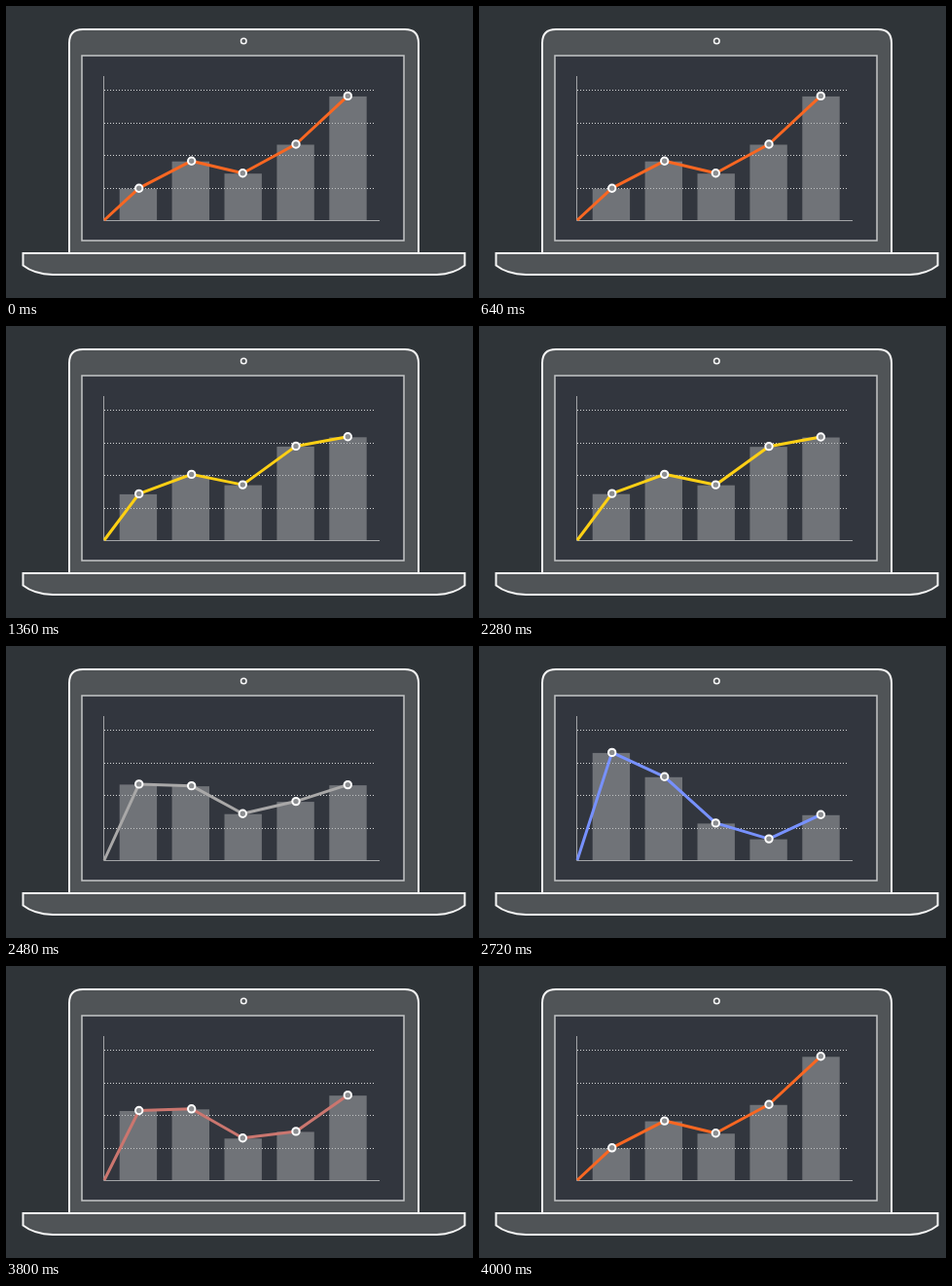
These frames come from a looping animation (480x300 px, 4040 ms). An HTML page:

```html
<!DOCTYPE html>
<html lang="en">
<head>
<meta charset="utf-8">
<title>Laptop chart</title>
<style>
  html, body { margin: 0; width: 100%; height: 100%; overflow: hidden; background: #2f3438; }
  svg { display: block; width: 100%; height: 100%; }
</style>
</head>
<body>
<svg viewBox="0 0 480 300">
  <g fill="#505457" stroke="#f6f6f6" stroke-width="2">
    <path d="M65 254V38Q65 24 79 24H410Q424 24 424 38V254Z"/>
    <path d="M17.5 254H471.5V266.5Q460 275.5 443 276H48Q29 275.5 17.5 266.5Z"/>
    <circle cx="244.3" cy="36" r="2.8" stroke-width="1.5"/>
  </g>
  <rect x="78" y="51" width="331" height="190" fill="#32363e" stroke="#c4c6c7" stroke-width="1.5"/>
  <path d="M101 86.5H380M101 120.5H380M101 153.5H380M101 187.5H380"
        stroke="#d4d5d6" stroke-dasharray="1 2" fill="none"/>
  <g id="bars" fill="#aeb0b1" fill-opacity=".5"></g>
  <path d="M100.5 72V220.5H384" fill="none" stroke="#a2a4a7"/>
  <polyline id="line" fill="none" stroke-width="3" stroke-linejoin="round"/>
  <g id="dots" fill="#8c8e91" stroke="#fff" stroke-width="2"></g>
</svg>
<script>
  const LOOP = 4040, MOVE = 445, BASE = 220;
  const xs = [136.7, 190.7, 243.3, 298, 351.3];
  const states = [
    { start: 3578, color: [248, 103, 34], ys: [187.2, 159.2, 171.7, 142, 92.4] },
    { start: 909, color: [255, 208, 20], ys: [172.4, 152.4, 163.1, 123.4, 113.8] },
    { start: 2262, color: [119, 145, 255], ys: [109.4, 134.3, 181.9, 198.1, 173.3] }
  ];

  const add = (id, tag, attrs) => {
    const el = document.createElementNS('http://www.w3.org/2000/svg', tag);
    for (const key in attrs) el.setAttribute(key, attrs[key]);
    return document.getElementById(id).appendChild(el);
  };
  const bars = xs.map((x, i) => add('bars', 'rect', { x: 116.7 + 53.9 * i, width: 38.4 }));
  const dots = xs.map(x => add('dots', 'circle', { cx: x, r: 3.7 }));
  const line = document.getElementById('line');

  const ease = p => p < 0.5 ? 2 * p * p : 1 - 2 * (1 - p) ** 2;
  const mix = (a, b, k) => a.map((v, i) => v + (b[i] - v) * k);

  function draw(t) {
    const to = t < states[1].start || t >= states[0].start ? 0 : t < states[2].start ? 1 : 2;
    const next = states[to], prev = states[(to + 2) % 3];
    const elapsed = (t - next.start + LOOP) % LOOP;
    const k = ease(Math.min(1, elapsed / MOVE));
    const ys = mix(prev.ys, next.ys, k);
    // The colour arrives a little ahead of the shape.
    const color = mix(prev.color, next.color, Math.min(1, k * 1.3));

    ys.forEach((y, i) => {
      const top = y + 0.5;
      bars[i].setAttribute('y', top);
      bars[i].setAttribute('height', BASE - top);
      dots[i].setAttribute('cy', y);
    });
    line.setAttribute('points', `101,${BASE} ` + xs.map((x, i) => `${x},${ys[i]}`).join(' '));
    line.setAttribute('stroke', `rgb(${color.map(Math.round)})`);
  }

  const begin = performance.now();
  function tick() {
    draw((performance.now() - begin) % LOOP);
    requestAnimationFrame(tick);
  }
  tick();
</script>
</body>
</html>
```
